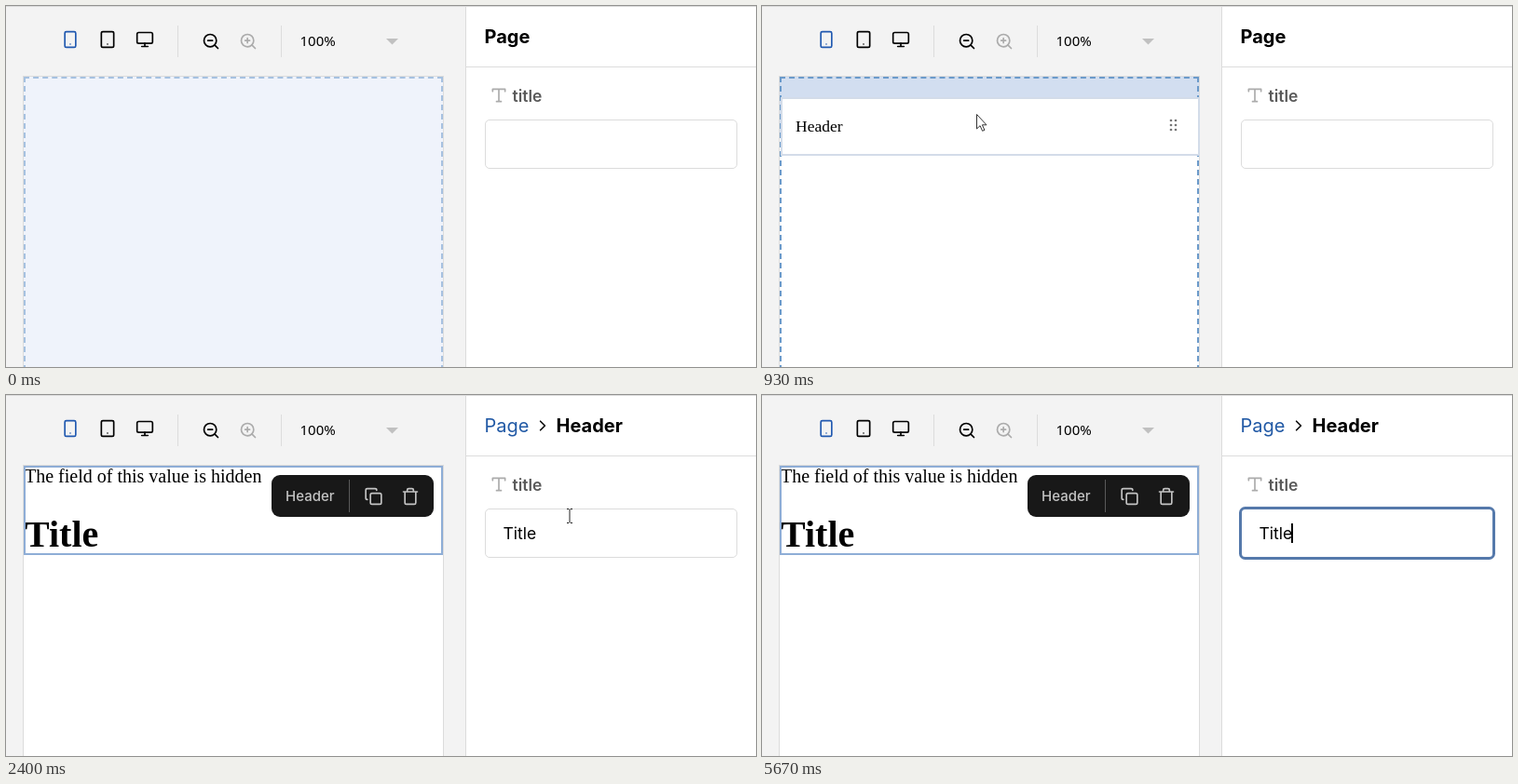
Recreate the animation shown at these times as an HTML page. Size 805x388 px, loop 5940 ms.

```html
<!DOCTYPE html>
<html lang="en">
<head>
<meta charset="utf-8">
<title>Page editor</title>
<style>
  html, body { margin: 0; width: 100%; height: 100%; overflow: hidden; background: #f3f3f3; }
  svg { display: block; }
  text { font: 17.5px Inter, sans-serif; white-space: pre; }
  .heading { font-size: 20px; }
  .bold { font-weight: 700; }
  .serif { font: 17.5px "Liberation Serif", serif; }
  .icon { fill: none; stroke: #000; stroke-width: 2; stroke-linecap: round; stroke-linejoin: round; }
  .line { fill: #dcdcdc; }
  .hidden { display: none; }
</style>
</head>
<body>
<svg width="805" height="388" viewBox="0 0 805 388">
  <defs>
    <g id="dots" fill="#767676">
      <circle cx="-2.5" cy="-5" r="1.35"/><circle cx="2.5" cy="-5" r="1.35"/>
      <circle cx="-2.5" r="1.35"/><circle cx="2.5" r="1.35"/>
      <circle cx="-2.5" cy="5" r="1.35"/><circle cx="2.5" cy="5" r="1.35"/>
    </g>
  </defs>

  <!-- toolbar -->
  <rect width="805" height="388" fill="#f3f3f3"/>
  <g class="icon">
    <g transform="translate(59 26) scale(.833)" stroke="#2159b0"><rect x="5" y="2" width="14" height="20" rx="2"/><path d="M12 18h.01"/></g>
    <g transform="translate(99 26) scale(.833)"><rect x="4" y="2" width="16" height="20" rx="2"/><path d="M12 18h.01"/></g>
    <g transform="translate(139 26) scale(.833)"><rect x="2" y="3" width="20" height="14" rx="2"/><path d="M8 21h8M12 17v4"/></g>
    <g transform="translate(210 28) scale(.833)"><circle cx="11" cy="11" r="8"/><path d="M21 21l-4.35-4.35M8 11h6"/></g>
    <g transform="translate(250 28) scale(.833)" stroke="#ababab"><circle cx="11" cy="11" r="8"/><path d="M21 21l-4.35-4.35M8 11h6M11 8v6"/></g>
  </g>
  <rect class="line" x="184" y="21" width="1" height="34"/>
  <rect class="line" x="295" y="21" width="1" height="34"/>
  <text x="315.5" y="43" style="font:15px 'Noto Sans', sans-serif">100%</text>
  <path d="M408 35h13l-6.5 6.5z" fill="#c0c0c0"/>

  <!-- canvas -->
  <rect class="line" x="18" y="75" width="452" height="320"/>
  <rect id="zone" x="19" y="76" width="450" height="320"/>
  <rect id="slot" x="19" y="76" width="450" height="63" fill="#d2def0"/>
  <g id="dashes" stroke="#6b9aca" stroke-width="2">
    <path d="M19 77H469" stroke-dasharray="6 4.09"/>
    <path d="M20 76V400M468 76V400" stroke-dasharray="6 4"/>
  </g>
  <g id="block">
    <rect x="1" y="1" width="448" height="61" fill="#fff" stroke="#d3dce9" stroke-width="2"/>
    <text class="serif" x="16" y="37">Header</text>
    <use href="#dots" x="421.5" y="30"/>
  </g>
  <g id="content">
    <text class="serif" x="20" y="94" style="font-size:20px">The field of this value is hidden</text>
    <text class="serif" x="20" y="163" style="font-size:40px;font-weight:700">Title</text>
    <rect x="20" y="77" width="448" height="94" fill="none" stroke="#8eadd6" stroke-width="2"/>
    <rect x="285" y="86" width="174" height="45" rx="9" fill="#181818"/>
    <text x="300" y="114" fill="#c3c3c3" style="font-size:15px;font-weight:500">Header</text>
    <rect x="368" y="91" width="1" height="35" fill="#5a5a5a"/>
    <g class="icon" style="stroke:#c3c3c3">
      <path transform="translate(384.5 99) scale(.833)" d="M10 8h10a2 2 0 0 1 2 2v10a2 2 0 0 1-2 2H10a2 2 0 0 1-2-2V10a2 2 0 0 1 2-2zM4 16c-1.1 0-2-.9-2-2V4c0-1.1.9-2 2-2h10c1.1 0 2 .9 2 2"/>
      <path transform="translate(424 99) scale(.833)" d="M3 6h18M19 6v14c0 1-1 2-2 2H7c-1 0-2-1-2-2V6M8 6V4c0-1 1-2 2-2h4c1 0 2 1 2 2v2"/>
    </g>
  </g>

  <!-- side panel -->
  <rect x="494" y="0" width="311" height="388" fill="#fff"/>
  <rect class="line" x="493" y="0" width="1" height="388"/>
  <rect class="line" x="494" y="65" width="311" height="1"/>
  <rect class="line" width="805" height="1"/>
  <text id="pageTitle" class="heading bold" x="513.5" y="40">Page</text>
  <g id="crumbs">
    <text class="heading" x="513.5" y="40" fill="#2159a5">Page</text>
    <path class="icon" transform="translate(566.4 23.4) scale(.8)" d="M9 18l6-6-6-6"/>
    <text class="heading bold" x="590.5" y="40">Header</text>
  </g>
  <path class="icon" style="stroke:#ababab" transform="translate(519 86) scale(.833)" d="M4 7V4h16v3M9 20h6M12 4v16"/>
  <text x="543.5" y="103" fill="#5a5a5a" style="font-weight:600">title</text>
  <rect x="514.5" y="122.5" width="270" height="52" rx="4.5" fill="#fff" stroke="#dcdcdc"/>
  <rect id="focus" x="513.5" y="121.5" width="272" height="54" rx="5" fill="#fff" stroke="#5579ab" stroke-width="3"/>
  <text id="value" x="533.5" y="155">Title</text>
  <rect id="caret" x="568" y="138" width="2" height="21"/>

  <!-- dragged item and pointer -->
  <g id="card">
    <rect x=".5" y=".5" width="271" height="62" rx="4.5" fill="#fff" stroke="#dcdcdc"/>
    <text x="15.5" y="38">Header</text>
    <use href="#dots" x="243.5" y="31"/>
  </g>
  <path id="arrow" d="M.5 .5V16l3.6-3.3 2.5 5.6 2.3-1-2.5-5.5H11z" fill="#fff" stroke="#333"/>
  <path id="hand" d="M-4.5 6.5V5C-6 3-7 1-6.8-.5-6.5-1.8-5-1.8-4.5-.8V-4C-4.3-5.8-2.3-5.8-2-4.5-2-7 .6-7 .8-5 1.2-6.8 3.4-6.4 3.6-4.4 4.2-5.6 6.2-5 6.3-3.2V1C6.2 3 5 4 4.8 6.5zM-2-4.5v1.5M.8-5v2M3.6-4.4v1.5" fill="#fff" stroke="#000" stroke-linejoin="round"/>
  <path id="beam" d="M-3-7.5H-1L0-6.5 1-7.5H3M0-6.5V6.5M-3 7.5H-1L0 6.5 1 7.5H3" fill="none" stroke="#222"/>
</svg>
<script>
  const LOOP = 5940, STEP = 200 / 3, BLINK = 533;
  const INSERT = 733, DROP = 1267, SETTLED = 1533, SELECT = 1667, FOCUS = 2467;

  // Stops of the pointer: time, x, y
  const STOPS = [
    [0, -140, 20], [533, 216, 53], [933, 230, 116], [1600, 230, 116], [1867, 288, 59],
    [2400, 605, 130], [3733, 605, 130], [3933, 733, 97], [4000, 733, 97], [4267, 820, 30]
  ];

  const el = id => document.getElementById(id);
  const show = (id, on) => el(id).classList.toggle("hidden", !on);
  const move = (id, x, y) => el(id).setAttribute("transform", `translate(${x.toFixed(1)} ${y.toFixed(1)})`);
  const clamp = k => Math.min(1, Math.max(0, k));
  const smooth = k => k * k * (3 - 2 * k);
  const progress = (t, from, to) => smooth(clamp((t - from) / (to - from)));

  function pointerAt(t) {
    let [, x, y] = STOPS[0];
    for (let i = 1; i < STOPS.length; i++) {
      const [from, x0, y0] = STOPS[i - 1], [to, x1, y1] = STOPS[i];
      const k = progress(t, from, to);
      x += (x1 - x0) * k;
      y += (y1 - y0) * k;
    }
    return [x, y];
  }

  function pointerShape(t, x, y) {
    if (t < INSERT) return "hand";
    if (t < SETTLED) return "arrow";
    if (x < 494) return y > 76 ? "hand" : "arrow";
    return x < 680 && y > 122 ? "beam" : "arrow";
  }

  function draw(t) {
    const [x, y] = pointerAt(t);
    const shape = pointerShape(t, x, y);
    for (const id of ["arrow", "hand", "beam"]) show(id, id === shape);
    move(shape, x, y);

    show("card", t < INSERT);
    move("card", x - 135, y - 23);

    const inserted = t >= INSERT && t < SELECT;
    el("zone").setAttribute("fill", t < INSERT ? "#eff3fb" : "#fff");
    el("dashes").setAttribute("opacity", 0.55 + 0.45 * clamp(t / 133));
    show("dashes", t < SETTLED);
    show("slot", inserted && t < SETTLED);
    show("block", inserted);
    const drop = progress(t, DROP, SETTLED);
    move("block", 20 - drop, t < DROP ? y - 18 : 98 - 22 * drop);

    const selected = t >= SELECT;
    for (const id of ["content", "crumbs", "value"]) show(id, selected);
    show("pageTitle", !selected);
    show("focus", t >= FOCUS);
    show("caret", t >= FOCUS && Math.floor((t - FOCUS) / BLINK) % 2 === 0);
  }

  const start = performance.now();
  function tick() {
    const t = (performance.now() - start) % LOOP;
    draw(Math.round(Math.floor((t + 4) / STEP) * STEP));
    requestAnimationFrame(tick);
  }
  tick();
</script>
</body>
</html>
```
